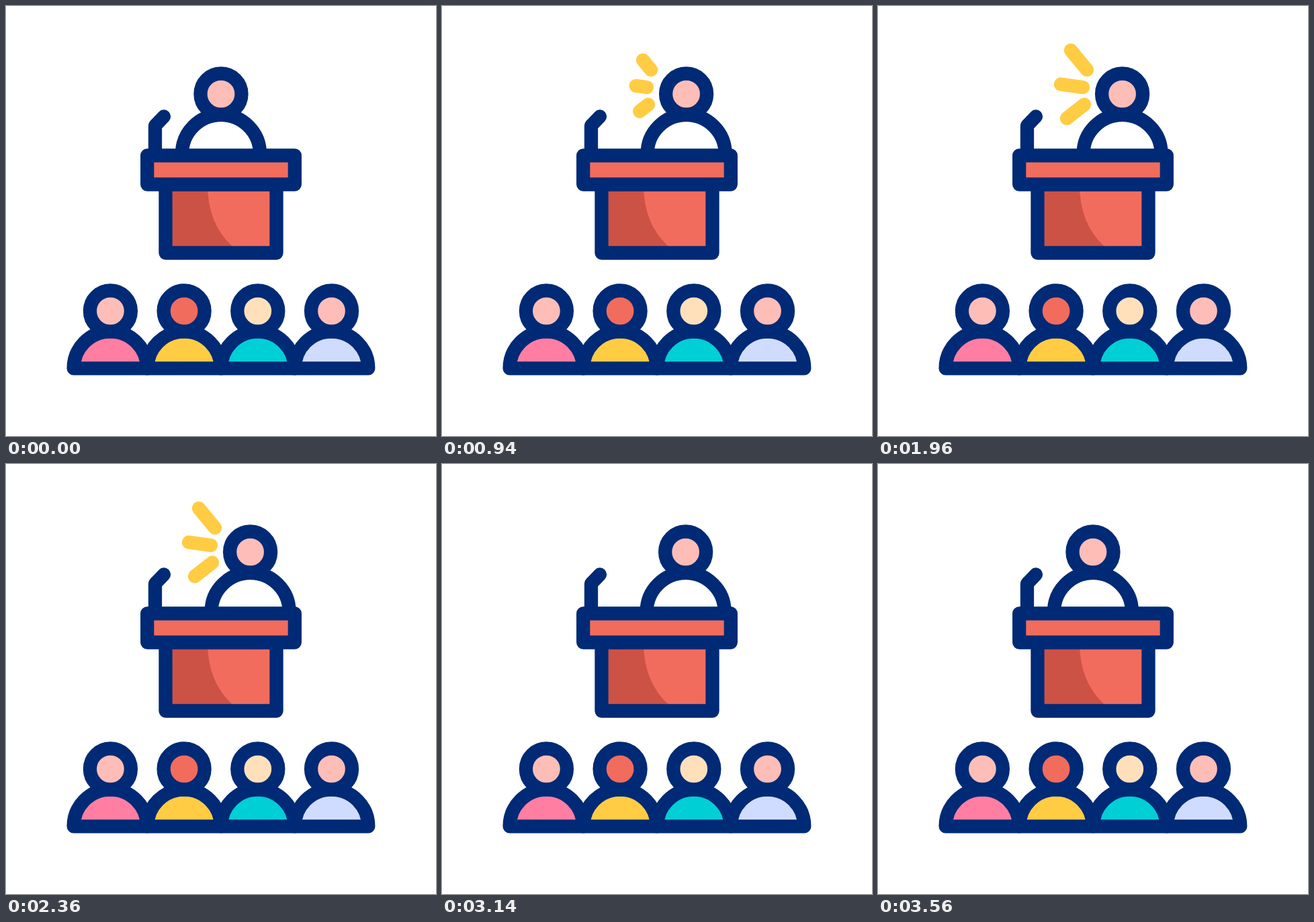
Write an HTML page that moves like this. It is 640 by 640 pixels and loops after 3.6 s.

```html
<!DOCTYPE html>
<html lang="en">
<head>
<meta charset="utf-8">
<title>Speaker at a podium</title>
<style>
  html, body { margin: 0; width: 100%; height: 100%; overflow: hidden; background: #fff; }
  svg { display: block; width: 100%; height: 100%; }
  .line { stroke: #002a75; stroke-width: 20.3; stroke-linecap: round; stroke-linejoin: round; }
  #rays { stroke: #ffcc43; stroke-width: 20.3; stroke-linecap: round; }
</style>
</head>
<body>
<svg viewBox="0 0 640 640">
  <g id="rays"></g>
  <g id="speaker" class="line">
    <path d="M262 222v-2a58 58 0 0 1 116 0v2" fill="#fff"/>
    <circle cx="320" cy="131" r="30.5" fill="#ffbdb7"/>
  </g>
  <path class="line" d="M222 222V178L235 164.5" fill="none"/>
  <path d="M237.5 265.5h165v102h-165z" fill="#f16c5d"/>
  <path d="M238 266H300Q300 324 337 358V367H238z" fill="#cd5246"/>
  <path class="line" d="M237.5 265.5h165v102h-165z" fill="none"/>
  <path class="line" d="M210.2 222.5h219.6v43H210.2z" fill="#f16c5d"/>
  <g id="audience" class="line"></g>
</svg>
<script>
const LOOP = 3600;
const $ = id => document.getElementById(id);

function add(parent, tag, attrs) {
  const el = document.createElementNS('http://www.w3.org/2000/svg', tag);
  for (const name in attrs) el.setAttribute(name, attrs[name]);
  return parent.appendChild(el);
}

const people = [
  ['#ffbdb7', '#ff7ea2'],
  ['#f16c5d', '#ffcc43'],
  ['#ffe0bb', '#00cfd5'],
  ['#ffbdb7', '#d0dcff']
];
people.forEach(([skin, shirt], i) => {
  const x = 155.4 + i * 109.7;
  add($('audience'), 'path', { d: `M${x - 54.8} 539.3a54.8 54.8 0 0 1 109.6 0z`, fill: shirt });
  add($('audience'), 'circle', { cx: x, cy: 454, r: 30.5, fill: skin });
});

// Inner end and full-length vector of each ray.
const rays = [
  [311, 95, -25.8, -31.2],
  [305, 121, -35.5, -4.8],
  [307, 146.7, -28, 22]
].map(([x, y, dx, dy]) => ({ x, y, dx, dy, el: add($('rays'), 'line', { x1: x, y1: y }) }));

function ease(t, from, to) {
  const u = Math.min(1, Math.max(0, (t - from) / (to - from)));
  return u * u * (3 - 2 * u);
}

function rayLength(t) {
  if (t < 800) return ease(t, 400, 800);
  if (t > 2800) return 1 - ease(t, 2800, 3100);
  const phase = t % 400;
  return 1 - 0.683 * ease(Math.min(phase, 400 - phase), 0, 200);
}

function draw(t) {
  const shift = 43.6 * (ease(t, 0, 440) - ease(t, 3100, 3560));
  $('speaker').setAttribute('transform', `translate(${shift} 0)`);

  const length = rayLength(t);
  $('rays').setAttribute('visibility', length > 0 ? 'visible' : 'hidden');
  for (const { x, y, dx, dy, el } of rays) {
    el.setAttribute('x2', x + dx * length);
    el.setAttribute('y2', y + dy * length);
  }
}

function tick() {
  draw(performance.now() % LOOP);
  requestAnimationFrame(tick);
}
tick();
</script>
</body>
</html>
```
